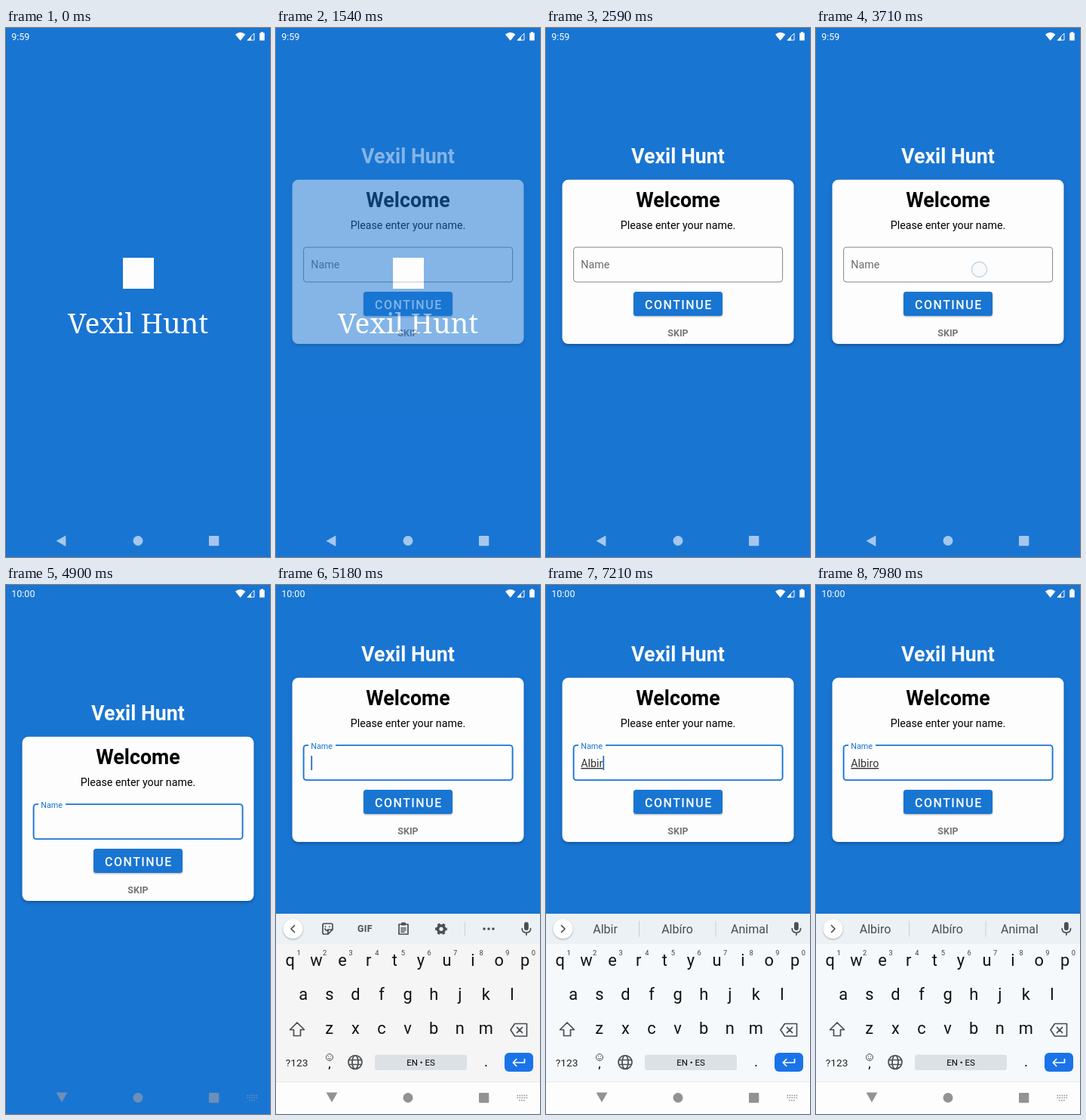
These frames come from a looping animation (350 by 700 pixels, 8000 ms). An HTML page:

```html
<!DOCTYPE html>
<html lang="en">
<head>
<meta charset="utf-8">
<title>Vexil Hunt</title>
<style>
html, body { margin: 0; width: 100%; height: 100%; overflow: hidden; background: #1975d2; }
svg { display: block; width: 350px; height: 700px; font-family: Roboto, sans-serif; }
.mid { text-anchor: middle; }
.bold { font-weight: 700; }
.line { fill: none; stroke: #4a4e52; stroke-width: 1.7; stroke-linejoin: round; stroke-linecap: round; }
.thin { stroke-width: 1; }
.solid { fill: #4a4e52; }
.card { filter: drop-shadow(0 2px 2px rgba(0, 0, 0, .28)); }
.lift { filter: drop-shadow(0 1px 1px rgba(0, 0, 0, .3)); }
</style>
</head>
<body>
<svg viewBox="0 0 350 700">
  <rect width="350" height="700" fill="#1975d2"/>

  <g id="splash" fill="#fdfdfd">
    <rect x="155" y="304" width="41" height="41"/>
    <text class="mid" x="175" y="404" font-size="37" font-family="Noto Serif, serif">Vexil Hunt</text>
  </g>

  <g id="welcome">
    <rect width="350" height="800" fill="#1975d2"/>
    <text class="mid bold" x="175" y="179.3" font-size="26.75" fill="#fdfdfd">Vexil Hunt</text>
    <rect class="card" x="21.5" y="200.8" width="307" height="217.2" rx="8" fill="#fdfdfd"/>
    <text class="mid bold" x="175" y="236.8" font-size="26.75">Welcome</text>
    <text class="mid" x="175" y="266" font-size="14.26">Please enter your name.</text>
    <rect id="box" x="36.6" y="290.1" width="277" height="46" rx="3.6" fill="none"/>
    <rect id="notch" x="43" y="287" width="36" height="6" fill="#fdfdfd"/>
    <text id="label" x="46.3">Name</text>
    <text id="typed" x="46.3" y="319" font-size="14.26" fill="#333" text-decoration="underline"></text>
    <rect id="caret" y="304" width="1.8" height="19" fill="#2a6fb8"/>
    <rect class="lift" x="116" y="349" width="118" height="32" rx="3.5" fill="#1975d2"/>
    <text x="131" y="372" font-size="16" font-weight="500" letter-spacing="1.5" fill="#fdfdfd">CONTINUE</text>
    <text class="mid bold" x="175" y="407.5" font-size="12.5" fill="#757575">SKIP</text>
    <circle id="touch" cx="216.5" cy="319.5" r="10" fill="#f8fafc" stroke="#c3d5e6" stroke-width="1.3"/>
  </g>

  <g id="keyboard">
    <rect id="keyBg" y="435" width="350" height="222"/>
    <rect y="435" width="350" height="40" fill="#ebf1f4"/>
    <rect y="657" width="350" height="43" fill="#fdfdfd"/>
    <path d="M0 657.5H350" stroke="#e6e8ea"/>
    <circle class="lift" cx="22.5" cy="455" r="13" fill="#fff"/>
    <path id="chevron" class="line"/>

    <g id="tools">
      <path class="line" d="M64 448h9q2 0 2 2v6l-6 6h-5q-2 0-2-2v-10q0-2 2-2zM75 456h-4q-2 0-2 2v4M65 455q2 4 4 1M65.5 452v.3M71 452v.3"/>
      <text class="mid bold" x="118" y="459" font-size="12.3" letter-spacing=".4" fill="#4a4e52">GIF</text>
      <path class="line" d="M163 449h12v13h-12zM166 454h6M166 456.5h6M166 459h4"/>
      <rect class="solid" x="166" y="446.5" width="6" height="4" rx="1"/>
      <g fill="none" stroke="#4a4e52">
        <circle cx="219" cy="455.2" r="4.4" stroke-width="3.6"/>
        <circle cx="219" cy="455.2" r="6.7" stroke-width="2.4" stroke-dasharray="3.5 3.516" stroke-dashoffset="1.75"/>
      </g>
      <path d="M250.5 446v18" stroke="#c9d0d5"/>
      <g class="solid"><circle cx="276" cy="455" r="1.8"/><circle cx="282" cy="455" r="1.8"/><circle cx="288" cy="455" r="1.8"/></g>
    </g>
    <g id="hints" class="mid" font-size="16" fill="#4a4e52">
      <text x="78.5" y="461"></text><text x="174" y="461"></text><text x="270" y="461"></text>
      <path d="M123.5 444.5v21M225 444.5v21" stroke="#c9d0d5"/>
    </g>
    <rect class="solid" x="329" y="446" width="5.8" height="11" rx="2.9"/>
    <path class="line" d="M326.2 454.5q0 5.5 5.7 5.5t5.7-5.5M331.9 460v3"/>

    <g id="keys" class="mid" fill="#111"></g>

    <path class="line" d="M28 579l9.5 9.5h-5v8h-9v-8h-5z"/>
    <path class="line" d="M316.5 580.5h16v16.500h-16l-5.500-8.200zM319.500 585.300l7 7M326.500 585.300l-7 7"/>
    <text x="12.8" y="636.5" font-size="13.7" fill="#222">?123</text>
    <circle class="line thin" cx="71" cy="625" r="4.5"/>
    <path class="line thin" d="M69 626.5q2 2.2 4 0M69.4 623.5v.2M72.6 623.5v.2"/>
    <text class="mid" x="71" y="639" font-size="17">,</text>
    <g class="line">
      <circle cx="105" cy="631.5" r="9"/><ellipse cx="105" cy="631.5" rx="4" ry="9"/><path d="M97 628.5h16M97 634.5h16"/>
    </g>
    <rect x="131" y="621.5" width="122" height="20.5" rx="3" fill="#dce1e6"/>
    <text class="mid" x="192" y="636" font-size="11.5">EN • ES</text>
    <text class="mid" x="278.5" y="637" font-size="19">.</text>
    <rect x="303" y="619" width="38" height="25" rx="6" fill="#1a73e8"/>
    <path class="line" style="stroke:#fff" d="M329.500 627.5v4.500h-15M318.700 627.500l-4.500 4.500 4.500 4.500"/>
  </g>

  <g fill="#fdfdfd">
    <text id="clock" x="7.3" y="15.7" font-size="12.5"></text>
    <path d="M304 8.6Q310.7 2.8 317.4 8.6L310.7 16.7Z"/>
    <path d="M320.3 16L329 7V16Z" fill="none" stroke="#fdfdfd"/>
    <path d="M319.5 16.5L325 10.8V16.5Z"/>
    <path d="M336.2 6.5h1.8v-1.3h3v1.3h1.8v10h-6.6z"/>
  </g>
  <g id="nav">
    <path id="back"/>
    <circle cx="175" cy="678.5" r="6.5"/>
    <rect x="269" y="672" width="13.3" height="13.3" rx="1"/>
    <path id="swap" fill="none" stroke-width="1.6" stroke-dasharray="1.6 1.4" d="M319.5 675.5h14M319.5 678.5h14M322 682h9"/>
  </g>
</svg>
<script>
const LOOP = 8000, TICK = 70;
const $ = id => document.getElementById(id);
const show = (id, on) => $(id).style.display = on ? '' : 'none';
const set = (id, attrs) => { for (const k in attrs) $(id).setAttribute(k, attrs[k]); };
const clamp = v => Math.max(0, Math.min(1, v));
const mix = (a, b, p) => a + (b - a) * p;

// [start, typed text, suggestions]
const typing = [
  [0, ''],
  [6160, 'A'],
  [6650, 'Al', ['Al', 'Algo', 'Also']],
  [6790, 'Alb', ['Alb', 'Alba', 'Album']],
  [6930, 'Albi', ['Albi', 'Albíro', 'Animal']],
  [7210, 'Albir', ['Albir', 'Albíro', 'Animal']],
  [7420, 'Albiro', ['Albiro', 'Albíro', 'Animal']]
];
// [start, caret visible]
const blinks = [[0, false], [5180, true], [5810, false], [6160, true], [7980, false]];
const at = (steps, t) => steps.filter(s => s[0] <= t).pop();

function addKey(ch, x, y, size, fill = '#111') {
  const key = document.createElementNS('http://www.w3.org/2000/svg', 'text');
  key.textContent = ch;
  const attrs = { x, y, fill, 'font-size': size };
  for (const k in attrs) key.setAttribute(k, attrs[k]);
  $('keys').append(key);
}
[['qwertyuiop', 18.8, 504], ['asdfghjkl', 36.2, 549], ['zxcvbnm', 70.7, 594]].forEach(([row, x0, y], r) => {
  [...row].forEach((ch, i) => {
    const x = x0 + i * 34.6;
    addKey(ch, x, y, 21.8);
    if (!r) addKey((i + 1) % 10, x + 11.2, 489.8, 9.3, '#3c4043');
  });
});

function render(now) {
  const t = Math.floor(now % LOOP / TICK) * TICK;
  const open = t >= 5180, dark = t >= 4620;

  // Welcome screen fades in over the splash, then settles slowly
  const fade = t < 1750 ? .94 * clamp((t - 1330) / 420) : mix(.94, 1, clamp((t - 1750) / 350));
  set('welcome', { opacity: fade, transform: `translate(0 ${open ? -78 : 0})` });
  show('splash', fade < 1);
  show('touch', t >= 3710 && t < 4060);

  // Field focus: label floats into the outline
  const focus = clamp((t - 3990) / 210), p = 1 - (1 - focus) ** 2;
  set('label', {
    y: mix(318, 294.5, p), 'font-size': mix(14.26, 10.8, p),
    fill: focus ? '#1975d2' : '#6b6b6b'
  });
  set('box', { stroke: focus ? '#1975d2' : '#858585', 'stroke-width': focus ? 1.9 : 1 });
  show('notch', p > .6);

  const [, text, hints] = at(typing, t);
  $('typed').textContent = text;
  show('caret', at(blinks, t)[1]);
  set('caret', { x: 46.3 + (text ? $('typed').getComputedTextLength() : 0) });

  show('keyboard', open);
  show('tools', !hints);
  show('hints', hints);
  if (hints) document.querySelectorAll('#hints text').forEach((el, i) => el.textContent = hints[i]);
  set('chevron', { d: hints ? 'M20.5 450.5l4.5 4.5-4.5 4.5' : 'M24.5 450.5l-4.5 4.5 4.5 4.5' });
  set('keyBg', { fill: t < 5390 ? '#f5f5f5' : '#f5f9fb' });

  const tint = open ? '#929292' : dark ? '#6b8fb9' : '#a5c7ed';
  $('clock').textContent = dark ? '10:00' : '9:59';
  set('nav', { fill: tint });
  set('swap', { stroke: tint });
  set('back', { d: dark ? 'M66.5 671.5H81.5L74 684.5Z' : 'M66.5 678.7L79.3 671.5V686Z' });
  show('swap', dark);
}

let start;
function loop(now) {
  start ??= now;
  render(now - start);
  requestAnimationFrame(loop);
}
render(0);
requestAnimationFrame(loop);
</script>
</body>
</html>
```
